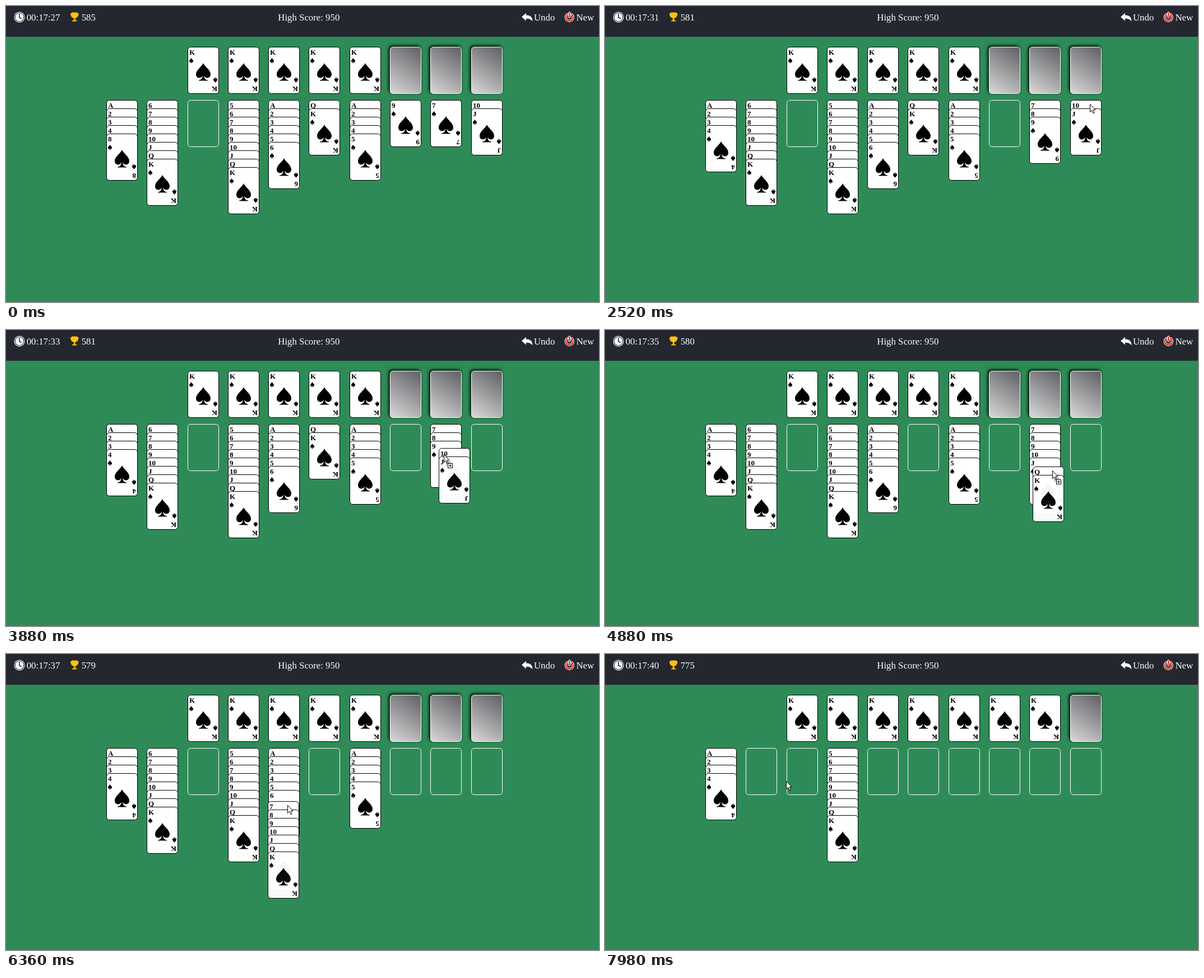
Animation of 1058 by 529 pixels, one loop 8000 ms. Source, as an HTML page with a canvas:

```html
<!DOCTYPE html>
<html lang="en">
<head>
<meta charset="utf-8">
<title>Spider solitaire</title>
<style>
  html, body { margin: 0; width: 100%; height: 100%; overflow: hidden; background: #2e8b57; }
  canvas, svg { position: absolute; left: 0; top: 0; }
  svg { background: #24272f; }
  text { font: 16.8px "Liberation Serif", serif; fill: #fff; }
</style>
</head>
<body>
<canvas id="table" width="1058" height="529"></canvas>
<svg width="1058" height="55">
  <circle cx="24" cy="20" r="9.5" fill="#fff"/>
  <circle cx="24" cy="20" r="7.8" fill="none" stroke="#24272f" stroke-width="1.1"/>
  <path d="M24 14V20.5L28 22.5" fill="none" stroke="#24272f" stroke-width="1.6"/>
  <path d="M117 11.5H127.5V13H129.5C129.5 18 127.5 20.5 124.5 21.5L123.500 22V25L126.500 26V27.500H118V26L121 25V22L120 21.5C117 20.5 115 18 115 13H117Z" fill="#ffc20e"/>
  <path d="M920 19.500L928 12.500V16.500C935 16.500 939 19 939.500 27.500C936.500 23.500 933 22.500 928 22.500V26.500Z" fill="#fff"/>
  <g fill="none" stroke-linecap="round">
    <path id="power" d="M1001.500 15A6.500 6.500 0 1 0 1009 15M1005.200 12.500V19.500" stroke="#fff" stroke-width="4.300"/>
    <path d="M1001.500 15A6.500 6.500 0 1 0 1009 15M1005.200 12.500V19.500" stroke="#dc2a20" stroke-width="2.300"/>
  </g>
  <text id="clock" x="36.700" y="25.500"></text>
  <text id="score" x="134.700" y="25.500"></text>
  <text x="540.300" y="25.500" text-anchor="middle">High Score: 950</text>
  <text x="942" y="25.500">Undo</text>
  <text x="1017.500" y="25.500">New</text>
</svg>
<script>
const LOOP = 8000, REST = 160, CARD_W = 56, CARD_H = 84, TOP_Y = 73;
const ctx = document.getElementById('table').getContext('2d');
const clock = document.getElementById('clock'), score = document.getElementById('score');
const RANKS = 'A 2 3 4 5 6 7 8 9 10 J Q K'.split(' ');
const SPADE = new Path2D('M0-16C2.500-9.500 13-4 13 4C13 8.500 10 10.500 7 10.500C4.500 10.500 2.500 9 1.200 6.500C1.500 11.500 3.500 14 8 14.500V15.500H-8V14.500C-3.500 14-1.500 11.500-1.200 6.500C-2.500 9-4.500 10.500-7 10.500C-10 10.500-13 8.500-13 4C-13-4-2.500-9.500 0-16Z');
const ARROW = new Path2D('M.5.5V14.500L3.600 11.500L6 16.800L8.200 15.800L5.900 10.700H10Z');

const colX = i => Math.round(179.05 + 72.28 * i);
const rowY = i => Math.round(168 + 15.05 * i);
const run = (first, last) => RANKS.slice(RANKS.indexOf(first), RANKS.indexOf(last) + 1);
const easeOut = u => u * (2 - u);
const easeInOut = u => u * u * (3 - 2 * u);

const deal = () => [
  [...run('A', '4'), '8'], run('6', 'K'), [], run('5', 'K'), run('A', '6'),
  run('Q', 'K'), run('A', '5'), ['9'], ['7'], run('10', 'J')
];

// grip: pointer inside the held card; slip: distance from the ideal spot on release
const MOVES = [
  { grab: 960, drop: 1624, from: 0, to: 8, count: 1, grip: [52, 51], slip: [10, 29] },
  { grab: 1940, drop: 2300, from: 7, to: 8, count: 1, grip: [43, 47] },
  { grab: 2680, drop: 3120, from: 9, to: 8, count: 2, fails: true },
  { grab: 3680, drop: 4120, from: 9, to: 8, count: 2, grip: [9, 11] },
  { grab: 4500, drop: 5100, from: 5, to: 8, count: 2 },
  { grab: 5760, drop: 6480, from: 8, to: 4, count: 7, slip: [-1, 5] },
  { grab: 7060, drop: 7520, from: 1, to: 6, count: 8 }
];

function finish(columns, move, held) {
  const target = columns[move.fails ? move.from : move.to];
  target.push(...held);
  if (move.fails) return 0;
  if (target.length < RANKS.length) return held.length === 1 ? -2 : -1;
  target.length = 0;
  return 98;
}

// The pointer travels to a card, rests, drags it, rests and lets go.
function planPointer() {
  const columns = deal(), legs = [];
  let place = [1010, 33], free = 440;
  const go = (start, end, to, ease) => {
    legs.push({ start, end, from: place, to, ease });
    place = to;
  };
  for (const move of MOVES) {
    const { grip = [35, 7], slip = [10, 2] } = move;
    const held = columns[move.from].splice(-move.count);
    move.origin = [colX(move.from), rowY(columns[move.from].length)];
    const goal = [colX(move.to), rowY(columns[move.to].length)];
    move.grip = grip;
    go(free, move.grab - REST, move.origin.map((v, k) => v + grip[k]), easeInOut);
    go(move.grab, move.drop - REST, goal.map((v, k) => v + slip[k] + grip[k]), easeOut);
    finish(columns, move, held);
    free = move.drop;
  }
  go(free, LOOP, [321, 227], easeInOut);
  return legs;
}
const LEGS = planPointer();

function pointerAt(t) {
  const leg = LEGS.findLast(l => t >= l.start) ?? LEGS[0];
  const u = Math.min(1, Math.max(0, (t - leg.start) / (leg.end - leg.start)));
  return leg.from.map((v, k) => Math.round(v + (leg.to[k] - v) * leg.ease(u)));
}

function stateAt(t) {
  const columns = deal();
  let done = 5, points = 585;
  for (const move of MOVES) {
    if (t < move.grab) break;
    const held = columns[move.from].splice(-move.count);
    if (t < move.drop) return { columns, done, points, move, held };
    const gain = finish(columns, move, held);
    points += gain;
    if (gain > 0) done++;
  }
  return { columns, done, points };
}

function box(x, y, fill, stroke) {
  ctx.beginPath();
  ctx.roundRect(x + .5, y + .5, CARD_W - 1, CARD_H - 1, 5);
  if (fill) { ctx.fillStyle = fill; ctx.fill(); }
  ctx.strokeStyle = stroke;
  ctx.lineWidth = 1;
  ctx.stroke();
}

function spade(x, y, scale) {
  ctx.save();
  ctx.translate(x, y);
  ctx.scale(scale, scale);
  ctx.fill(SPADE);
  ctx.restore();
}

function card(rank, x, y) {
  box(x, y, '#fff', '#000');
  ctx.save();
  ctx.translate(x, y);
  ctx.fillStyle = '#000';
  ctx.font = 'bold 13px "Liberation Serif", serif';
  spade(28, 45, 1);
  for (let end = 0; end < 2; end++) {
    ctx.fillText(rank, 3, 13.5);
    spade(6.5, 24.5, .28);
    ctx.translate(CARD_W, CARD_H);
    ctx.rotate(Math.PI);
  }
  ctx.restore();
}

function emptyFoundation(x) {
  const shade = ctx.createLinearGradient(x, TOP_Y + CARD_H, x + CARD_W, TOP_Y);
  shade.addColorStop(0, '#dadada');
  shade.addColorStop(1, '#5e5e63');
  ctx.save();
  ctx.shadowColor = '#000';
  ctx.shadowBlur = 5;
  ctx.shadowOffsetX = ctx.shadowOffsetY = -2;
  box(x, TOP_Y, shade, '#000');
  ctx.restore();
  box(x, TOP_Y, shade, '#fff');
}

function drawPointer(x, y, kind) {
  ctx.save();
  ctx.translate(x, y);
  ctx.strokeStyle = '#000';
  ctx.fillStyle = '#fff';
  ctx.lineWidth = 1;
  if (kind === 'no') {
    ctx.beginPath();
    ctx.arc(0, 0, 6, -Math.PI * 3 / 4, Math.PI * 5 / 4);
    ctx.lineTo(4, 4);
    for (const [width, color] of [[3.6, '#fff'], [1.9, '#000']]) {
      ctx.lineWidth = width;
      ctx.strokeStyle = color;
      ctx.stroke();
    }
  } else {
    ctx.fill(ARROW);
    ctx.stroke(ARROW);
  }
  if (kind === 'copy') {
    ctx.setLineDash([1, 1]);
    ctx.strokeRect(4.5, 13.5, 7, 6);
    ctx.setLineDash([]);
    ctx.fillRect(7.5, 16.5, 8, 8);
    ctx.strokeRect(7.5, 16.5, 8, 8);
    ctx.beginPath();
    ctx.moveTo(9, 20.5); ctx.lineTo(14, 20.5);
    ctx.moveTo(11.5, 18); ctx.lineTo(11.5, 23);
    ctx.stroke();
  }
  ctx.restore();
}

function draw(t) {
  const { columns, done, points, move, held } = stateAt(t);
  clock.textContent = '00:17:' + (27 + Math.floor((t + 110) / 610));
  score.textContent = points;

  ctx.fillStyle = '#2e8b57';
  ctx.fillRect(0, 0, 1058, 529);
  for (let i = 0; i < 8; i++) {
    if (i < done) card('K', colX(i + 2), TOP_Y);
    else emptyFoundation(colX(i + 2));
  }
  columns.forEach((cards, i) => {
    if (!cards.length) box(colX(i), rowY(0), null, '#fff');
    cards.forEach((rank, j) => card(rank, colX(i), rowY(j)));
  });

  if (t < 100) return;
  const [x, y] = pointerAt(t);
  let kind = 'arrow';
  if (move) {
    const [gripX, gripY] = move.grip;
    ctx.globalAlpha = .97;
    held.forEach((rank, j) => card(rank, x - gripX, y - gripY + Math.round(15.05 * j)));
    ctx.globalAlpha = 1;
    const into = x - colX(move.to);
    if (t < move.drop - REST) kind = into >= 0 && into <= CARD_W ? 'copy' : 'no';
  }
  drawPointer(x, y, kind);
}

function tick() {
  draw(performance.now() % LOOP);
  requestAnimationFrame(tick);
}
tick();
</script>
</body>
</html>
```
